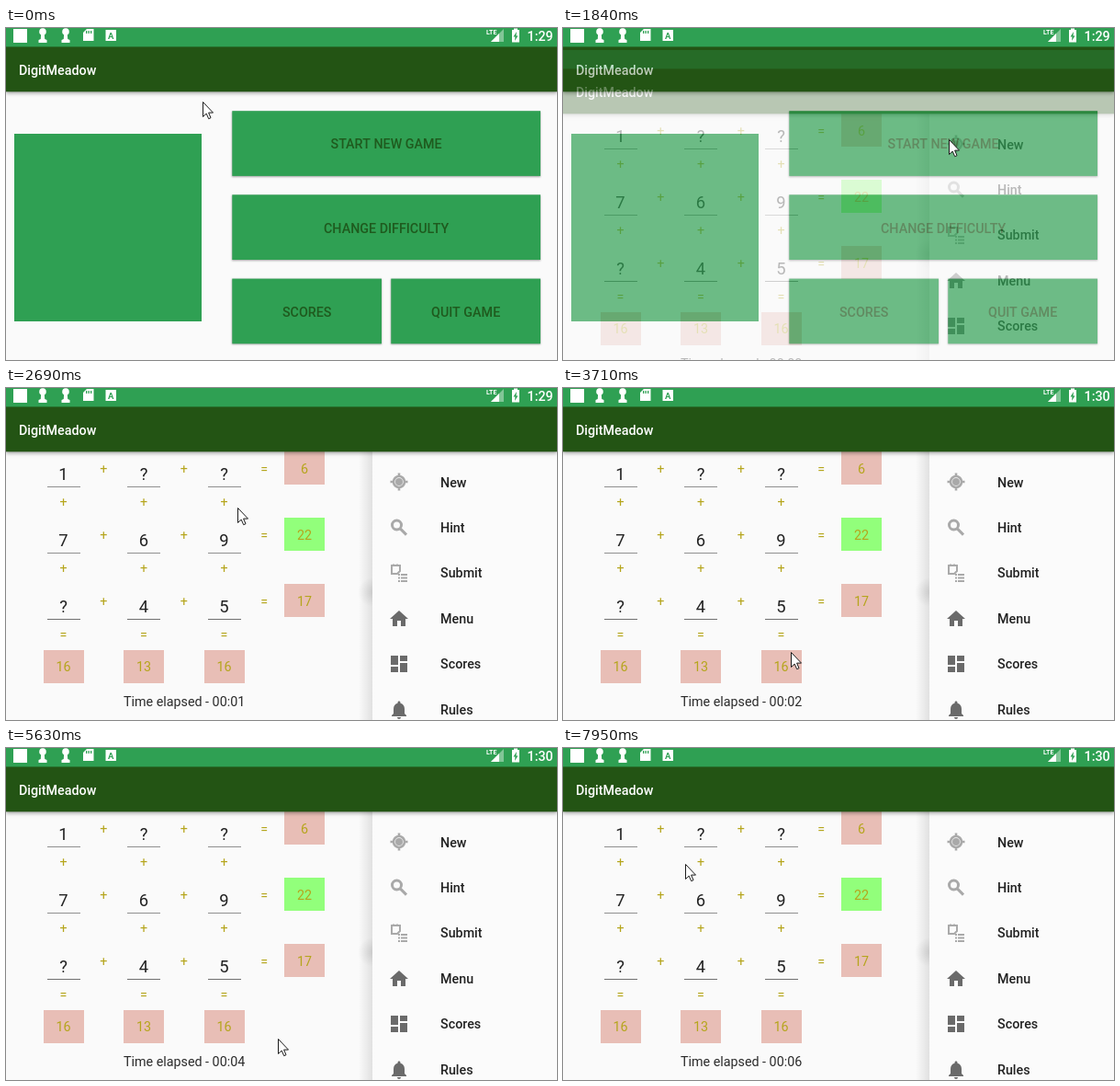
Animation of 600x361 px, one loop 8000 ms. Source, as an HTML page with a canvas:

```html
<!DOCTYPE html>
<html lang="en">
<head>
<meta charset="utf-8">
<title>DigitMeadow</title>
<style>
html, body { margin: 0; width: 100%; height: 100%; overflow: hidden; background: #fafafa; }
canvas { display: block; width: 600px; height: 361px; }
</style>
</head>
<body>
<canvas id="stage" width="600" height="361"></canvas>
<script>
const W = 600, H = 361, LOOP = 8000, STEP = 76.6;
const GREEN = '#2fa053', DARK = '#235414', PAPER = '#fafafa', OLIVE = '#b5a51c';
const PINK = '#e8beb6', LIME = '#92ff7b';

const stage = document.getElementById('stage').getContext('2d');
const layer = document.createElement('canvas');
layer.width = W;
layer.height = H;
const gameCtx = layer.getContext('2d');

// Each stroke is a list of [time, x, y] points of the pointer tip.
const strokes = [
  [[463, 214, 80], [1000, 420, 121]],
  [[2303, 420, 121], [2690, 251, 130], [3160, 144, 192], [3550, 200, 285], [3850, 320, 265],
   [4020, 365, 200], [4320, 455, 110], [4400, 480, 101], [4560, 501, 140], [4710, 489, 198],
   [4860, 484, 241], [5150, 440, 328], [5300, 385, 343], [5710, 264, 300], [6100, 160, 215],
   [6560, 64, 126], [6720, 55, 105], [6900, 80, 93], [7400, 154, 97]],
  [[7796, 154, 97], [7950, 133, 126]]
];

const homeIcon = new Path2D('M10 20v-6h4v6h5v-8h3L12 3 2 12h3v8z');
const tilesIcon = new Path2D('M3 13h8V3H3v10zm0 8h8v-6H3v6zm10 0h8V11h-8v10zm0-18v6h8V3h-8z');
const bellIcon = new Path2D('M12 22c1.1 0 2-.9 2-2h-4c0 1.1.9 2 2 2zm6-6v-5c0-3.1-1.6-5.6-4.5-6.3V4c0-.8-.7-1.5-1.5-1.5s-1.5.7-1.5 1.5v.7C7.6 5.4 6 7.9 6 11v5l-2 2v1h16v-1z');
const sightIcon = new Path2D('M12 2.5v4M12 17.5v4M2.5 12h4M17.5 12h4M18 12a6 6 0 1 1-12 0a6 6 0 1 1 12 0');
const lensIcon = new Path2D('M14.5 9a5 5 0 1 1-10 0a5 5 0 1 1 10 0M13 12.6L20 19.6');
const noteIcon = new Path2D('M6 2.5v2M10 2.5v2M4 4h9v6l-3 3H4z');
const listIcon = new Path2D('M11 13h2v2h-2zM14 13h7v2h-7zM11 16.5h2v2h-2zM14 16.5h7v2h-7zM11 20h2v2h-2zM14 20h7v2h-7z');
const arrow = new Path2D('M.5 .5V16.5L4.2 13.1 6.7 18.7 9 17.7 6.6 12.1H11.5Z');

function rect(c, color, x, y, w, h) {
  c.fillStyle = color;
  c.fillRect(x, y, w, h);
}

function text(c, str, x, baseline, color, { size = 14.3, weight = 400, align = 'center' } = {}) {
  c.font = `${weight} ${size}px Roboto, sans-serif`;
  c.textAlign = align;
  c.fillStyle = color;
  c.fillText(str, x, baseline);
}

function shadowRect(c, color, x, y, w, h, blur, drop) {
  c.save();
  c.shadowColor = 'rgba(0,0,0,.35)';
  c.shadowBlur = blur;
  c.shadowOffsetY = drop;
  rect(c, color, x, y, w, h);
  c.restore();
}

function bars(c) {
  shadowRect(c, DARK, 0, 20, W, 49.3, 4, 1.5);
  rect(c, GREEN, 0, 0, W, 20.4);
  text(c, 'DigitMeadow', 14, 50.6, '#fff', { weight: 500, align: 'left' });
}

function button(label, x, y, w, pressed) {
  shadowRect(stage, pressed ? '#2a924b' : GREEN, x, y, w, 70.7, pressed ? 5 : 2, pressed ? 2 : 0.6);
  text(stage, label, x + w / 2, y + 41.2, '#1f5a1e', { weight: 500 });
}

function drawHome(pressed) {
  rect(stage, PAPER, 0, 0, W, H);
  bars(stage);
  rect(stage, GREEN, 9, 115, 204, 204);
  button('START NEW GAME', 246.3, 90.2, 335.7, pressed);
  button('CHANGE DIFFICULTY', 246.3, 181.3, 335.7);
  button('SCORES', 246.3, 272.6, 162.7);
  button('QUIT GAME', 419.3, 272.6, 162.7);
}

function drawBoard(c, seconds) {
  const rows = [['1', '?', '?', '6'], ['7', '6', '9', '22'], ['?', '4', '5', '17']];
  const columnSums = ['16', '13', '16'];
  rows.forEach((row, r) => {
    const y = 93 + 72 * r;
    row.slice(0, 3).forEach((value, k) => {
      const x = 62.5 + 87.5 * k;
      text(c, value, x, y + 6.5, '#222', { size: 18.4 });
      rect(c, r < 2 ? '#909090' : '#707070', Math.round(x - 18), y + 14, 36, 1);
      text(c, k < 2 ? '+' : '=', x + 43.7, y, OLIVE);
      text(c, r < 2 ? '+' : '=', x, y + 36, OLIVE);
    });
    rect(c, r === 1 ? LIME : PINK, 303, y - 24, 44, 36);
    text(c, row[3], 325, y, OLIVE);
  });
  columnSums.forEach((sum, k) => {
    rect(c, PINK, Math.round(40.6 + 87.5 * k), 285, 44, 36);
    text(c, sum, 62.6 + 87.5 * k, 308, OLIVE);
  });
  text(c, `Time elapsed - 00:0${seconds}`, 128, 346.3, '#2b2b2b', { align: 'left' });
}

function icon(c, path, y, color, line) {
  c.save();
  c.translate(416, y - 12);
  c.fillStyle = c.strokeStyle = color;
  c.lineWidth = line;
  if (line) c.stroke(path);
  else c.fill(path);
  c.restore();
}

function drawDrawer(c) {
  const edge = c.createLinearGradient(384, 0, 399, 0);
  edge.addColorStop(0, 'rgba(0,0,0,0)');
  edge.addColorStop(1, 'rgba(0,0,0,.1)');
  rect(c, edge, 384, 69, 15, H);
  const spot = c.createRadialGradient(399, 222, 0, 399, 222, 16);
  spot.addColorStop(0, 'rgba(0,0,0,.1)');
  spot.addColorStop(1, 'rgba(0,0,0,0)');
  rect(c, spot, 383, 204, 16, 36);
  rect(c, '#fbfbfb', 399, 69, 201, H);

  ['New', 'Hint', 'Submit', 'Menu', 'Scores', 'Rules'].forEach((label, i) => {
    text(c, label, 473, 107.5 + 49.4 * i, '#222', { weight: 500, align: 'left' });
  });
  const pale = '#a9a9a9', gray = '#6a6a6a';
  icon(c, sightIcon, 102, pale, 2.6);
  c.fillStyle = pale;
  c.beginPath();
  c.arc(428, 102, 4, 0, 7);
  c.fill();
  icon(c, lensIcon, 152, pale, 3);
  icon(c, noteIcon, 201, pale, 2);
  icon(c, listIcon, 201, pale, 0);
  icon(c, homeIcon, 251, gray, 0);
  icon(c, tilesIcon, 300, gray, 0);
  icon(c, bellIcon, 350, gray, 0);
}

function drawGame(c, seconds) {
  rect(c, PAPER, 0, 0, W, H);
  drawBoard(c, seconds);
  drawDrawer(c);
  bars(c);
}

function polygon(c, color, ...points) {
  c.fillStyle = color;
  c.beginPath();
  points.forEach(([x, y]) => c.lineTo(x, y));
  c.fill();
}

function drawStatus(c, t) {
  rect(c, GREEN, 0, 0, W, 20);
  rect(c, '#fff', 8, 1, 15, 15);
  for (const x of [40, 65]) {
    c.fillStyle = '#fff';
    c.beginPath();
    c.arc(x, 4, 3.8, 0, 7);
    c.fill();
    polygon(c, '#fff', [x - 1.8, 6], [x + 1.8, 6], [x + 2.2, 12], [x + 4.5, 13], [x + 4.5, 16],
      [x - 4.5, 16], [x - 4.5, 13], [x - 2.2, 12]);
  }
  polygon(c, '#fff', [88, 1], [95.5, 1], [95.5, 14], [84, 14], [84, 5]);
  for (const x of [87, 89.5, 92]) rect(c, GREEN, x, 3, 1.3, 3);
  rect(c, '#fff', 108.5, 2, 11.5, 12);
  text(c, 'A', 114.2, 11.5, GREEN, { size: 9.5, weight: 700 });

  polygon(c, 'rgba(255,255,255,.4)', [542, 1], [542, 15], [528, 15]);
  polygon(c, '#fff', [537, 6], [537, 15], [528, 15]);
  text(c, 'LTE', 523, 6.6, '#fff', { size: 7, weight: 700, align: 'left' });
  rect(c, '#fff', 551, 2, 8, 13.5);
  rect(c, '#fff', 553, 0.5, 4, 2);
  polygon(c, GREEN, [556, 4], [552.5, 9.5], [554.5, 9.5], [554, 14], [557.5, 8.5], [555.5, 8.5]);
  text(c, t < 2950 ? '1:29' : '1:30', 595.7, 13.6, '#fff', { weight: 500, align: 'right' });
}

function pointerAt(t) {
  const stroke = strokes.filter(s => s[0][0] <= t).pop() || strokes[0];
  const start = stroke[0][0], last = stroke.length - 1;
  const time = start + Math.max(0, Math.floor((t - start) / STEP)) * STEP;
  if (time >= stroke[last][0]) return stroke[last].slice(1);

  const i = Math.max(0, stroke.findIndex(p => p[0] > time) - 1);
  const a = stroke[i], b = stroke[i + 1], span = b[0] - a[0];
  const u = Math.max(0, (time - a[0]) / span);
  const slope = (k, axis) => k === 0 || k === last ? 0 :
    (stroke[k + 1][axis] - stroke[k - 1][axis]) / (stroke[k + 1][0] - stroke[k - 1][0]);
  const ease = u * u * (3 - 2 * u);
  return [1, 2].map(axis => a[axis] + (b[axis] - a[axis]) * ease +
    span * u * (1 - u) * ((1 - u) * slope(i, axis) - u * slope(i + 1, axis)));
}

function drawPointer(c, t) {
  const [x, y] = pointerAt(t);
  c.save();
  c.translate(Math.round(x), Math.round(y));
  c.fillStyle = '#fff';
  c.strokeStyle = '#1c1c1c';
  c.lineWidth = 1;
  c.fill(arrow);
  c.stroke(arrow);
  c.restore();
}

function draw(t) {
  const seconds = Math.max(0, Math.floor((t - 1480) / 1000));
  if (t < 2000) drawHome(t >= 1230 && t < 1610);
  if (t >= 1840) {
    const [alpha, shift] = t < 1920 ? [0.3, 24] : t < 2000 ? [0.88, 8] : [1, 0];
    drawGame(gameCtx, seconds);
    stage.globalAlpha = alpha;
    stage.drawImage(layer, 0, shift);
    stage.globalAlpha = 1;
  }
  drawStatus(stage, t);
  drawPointer(stage, t);
}

let begin;
function tick(now) {
  begin ??= now;
  draw(Math.max(0, now - begin) % LOOP);
  requestAnimationFrame(tick);
}
draw(0);
requestAnimationFrame(tick);
</script>
</body>
</html>
```
